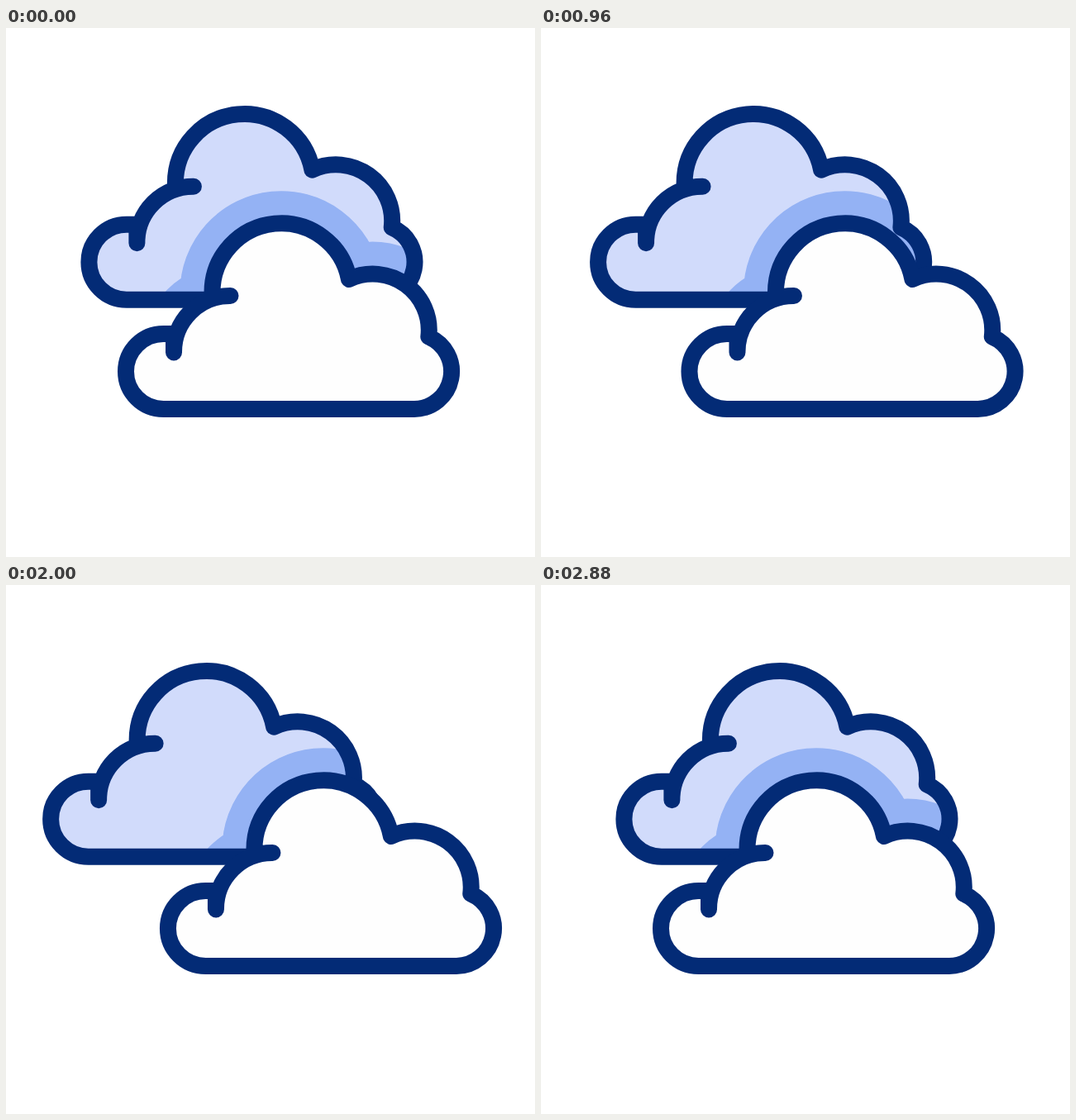
Recreate the animation shown at these times as an HTML page. Size 640 by 640 pixels, loop 2920 ms.

```html
<!DOCTYPE html>
<html lang="en">
<head>
<meta charset="utf-8">
<title>Drifting clouds</title>
<style>
  html, body { margin: 0; width: 100%; height: 100%; overflow: hidden; background: #fff; }
  svg { display: block; width: 100%; height: 100%; }
  .line { stroke: #032b76; stroke-width: 20; }
</style>
</head>
<body>
<svg viewBox="0 0 640 640" stroke-linecap="round" stroke-linejoin="round">
  <defs>
    <path id="cloud" d="M271.5 324 A68 68 0 0 0 203 392.5 V370 H190.5 A45.5 45.5 0 0 0 190.5 461
      H494 A45.5 45.5 0 0 0 511.3 373.6 A68 68 0 0 0 415 304 A83.5 83.5 0 0 0 249.5 320 V327"/>
    <clipPath id="backClip"><use href="#cloud" class="back"/></clipPath>
  </defs>
  <use href="#cloud" class="back" fill="#d1dbfb"/>
  <g clip-path="url(#backClip)">
    <use href="#cloud" class="front" fill="#94b2f4" stroke="#94b2f4" stroke-width="78"/>
  </g>
  <use href="#cloud" class="back line" fill="none"/>
  <use href="#cloud" class="front line" fill="#fefefe"/>
</svg>
<script>
  const LOOP = 2920, STEP = 40;
  const START = 520, PEAK = 1520, END = 2640;
  const FRONT_TRAVEL = 84, BACK_TRAVEL = 76.3;
  const BACK_X = -44.6, BACK_Y = -132.3;

  const fronts = document.querySelectorAll('.front');
  const backs = document.querySelectorAll('.back');

  const smooth = u => {
    u = Math.min(1, Math.max(0, u));
    return u * u * (3 - 2 * u);
  };

  const spread = t => t < PEAK
    ? smooth((t - START) / (PEAK - START))
    : smooth((END - t) / (END - PEAK));

  const place = (nodes, x, y) =>
    nodes.forEach(n => n.setAttribute('transform', `translate(${x} ${y})`));

  function draw(ms) {
    const t = Math.floor((ms % LOOP) / STEP) * STEP;
    const s = spread(t);
    place(fronts, FRONT_TRAVEL * s, 0);
    place(backs, BACK_X - BACK_TRAVEL * s, BACK_Y);
  }

  const origin = performance.now();
  function tick() {
    draw(performance.now() - origin);
    requestAnimationFrame(tick);
  }
  tick();
</script>
</body>
</html>
```
